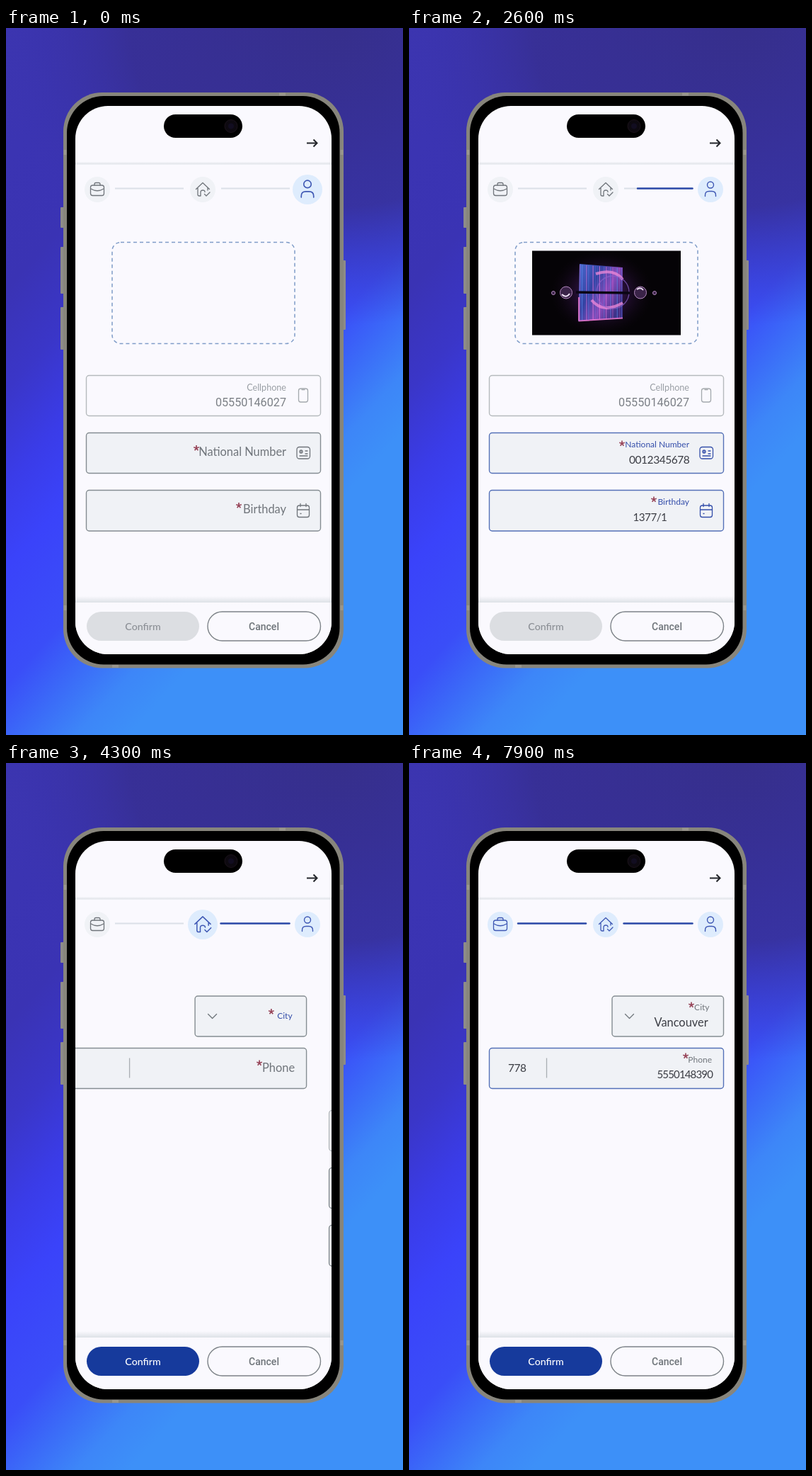
Write an HTML page that moves like this. It is 561x998 px and loops after 8000 ms.

```html
<!DOCTYPE html>
<html lang="en">
<head>
<meta charset="utf-8">
<title>Sign-up form</title>
<style>
html, body { margin: 0; width: 100%; height: 100%; overflow: hidden; background: #3a42fa; }
svg { display: block; width: 100vw; height: 100vh; }
text { font-family: Lato, sans-serif; font-size: 16.4px; fill: #70757b; }
.end { text-anchor: end; }
.mid { text-anchor: middle; }
.roboto { font-family: Roboto, sans-serif; }
.value { fill: #3c3e45; }
.icon { fill: none; stroke: #70777c; stroke-width: 1.3; stroke-linecap: round; stroke-linejoin: round; }
.box { fill: #f0f2f6; stroke: #858d92; stroke-width: 1.4; }
.rail { stroke: #dbe0e8; stroke-width: 1.8; }
.bar { stroke: #2b49a8; stroke-width: 2.5; stroke-linecap: round; }
.star { stroke: #98465a; stroke-width: 1.7; fill: none; }
</style>
</head>
<body>
<svg viewBox="0 0 561 998" preserveAspectRatio="none">
  <defs>
    <linearGradient id="sky" gradientUnits="userSpaceOnUse" x1="0" y1="0" x2="592" y2="536">
      <stop offset="0" stop-color="#3c35b0"/>
      <stop offset=".31" stop-color="#3a33b4"/>
      <stop offset=".43" stop-color="#3a36c8"/>
      <stop offset=".54" stop-color="#3a3ce8"/>
      <stop offset=".64" stop-color="#3a43fa"/>
      <stop offset=".78" stop-color="#3a4ef8"/>
      <stop offset=".865" stop-color="#3b6ef8"/>
      <stop offset=".93" stop-color="#3d86f8"/>
      <stop offset="1" stop-color="#3d90f8"/>
    </linearGradient>
    <radialGradient id="dusk">
      <stop offset="0" stop-color="#362f8c"/>
      <stop offset=".6" stop-color="#372f92" stop-opacity=".85"/>
      <stop offset="1" stop-color="#3a34b0" stop-opacity="0"/>
    </radialGradient>
    <linearGradient id="neon" x1="0" y1="0" x2="1" y2=".6">
      <stop offset="0" stop-color="#4a6ad0"/>
      <stop offset=".4" stop-color="#3240a0"/>
      <stop offset=".7" stop-color="#8a48b8"/>
      <stop offset="1" stop-color="#3a2c80"/>
    </linearGradient>
    <radialGradient id="halo">
      <stop offset="0" stop-color="#7a3ab0" stop-opacity=".75"/>
      <stop offset=".5" stop-color="#4a1c6a" stop-opacity=".4"/>
      <stop offset="1" stop-color="#1a0a20" stop-opacity="0"/>
    </radialGradient>
    <linearGradient id="shade" x1="0" y1="0" x2="0" y2="1">
      <stop offset="0" stop-color="#dfe3e8" stop-opacity="0"/>
      <stop offset="1" stop-color="#dde1e6"/>
    </linearGradient>
    <clipPath id="screen"><rect x="98" y="110" width="362" height="774" rx="46"/></clipPath>
    <clipPath id="reveal"><rect id="wipe" x="174" y="314.5" width="210" height="0"/></clipPath>
  </defs>

  <rect width="561" height="998" fill="url(#sky)"/>
  <ellipse cx="470" cy="0" rx="490" ry="420" fill="url(#dusk)"/>

  <g fill="#8d8b88">
    <rect x="77" y="253" width="7" height="29" rx="1"/>
    <rect x="77" y="309" width="7" height="66" rx="1"/>
    <rect x="77" y="394" width="7" height="60" rx="1"/>
    <rect x="474" y="328" width="6" height="98" rx="1"/>
  </g>
  <rect x="81" y="91" width="396" height="812.5" rx="55" fill="#87857c"/>
  <path d="M386 93.5h9M150 901h9M83.5 172v7M474.5 172v7M83.5 815v7M474.5 815v7" stroke="#99968c" stroke-width="4"/>
  <rect x="86" y="96" width="385.5" height="802.5" rx="52"/>

  <g clip-path="url(#screen)">
    <rect x="98" y="110" width="362" height="774" fill="#faf9fe"/>

    <g id="pageA">
      <rect x="150" y="302.5" width="258" height="143" rx="12" fill="none" stroke="#7f9cc8" stroke-width="1.5" stroke-dasharray="5 4"/>
      <g clip-path="url(#reveal)">
        <rect x="174" y="314" width="210" height="120" fill="#050306"/>
        <ellipse cx="272" cy="374" rx="72" ry="60" fill="url(#halo)"/>
        <path d="M241 333L302 338V410L239 414Z" fill="url(#neon)"/>
        <g id="threads" stroke-width="1.2"></g>
        <path d="M264 347q26-8 38 8M258 384q16 20 44 4" fill="none" stroke="#f08ada" stroke-width="4" opacity=".75"/>
        <path d="M239.5 413.5L302 409.5M240 380v33" stroke="#f07ad0" stroke-width="2" opacity=".8"/>
        <circle cx="288" cy="373" r="23" fill="none" stroke="#8a62cc" stroke-width="1.3" opacity=".7"/>
        <path d="M236 373L312 374" stroke="#0a0614" stroke-width="3.5"/>
        <g fill="#3a2348" stroke="#b58ac0">
          <circle cx="222" cy="373.5" r="8.5"/><circle cx="327" cy="373.5" r="8.5"/>
          <circle cx="204" cy="374" r="2.5"/><circle cx="347" cy="374" r="2.5"/>
        </g>
        <path d="M216 376q6 6 11-1M322 369q5-4 9 1" fill="none" stroke="#eee0f4" stroke-width="2"/>
      </g>

      <rect x="113.5" y="490.5" width="331" height="57" rx="4" fill="none" stroke="#b5babd" stroke-width="1.4"/>
      <text class="end" x="396" y="512" style="font-size:12.6px;fill:#9a9fa5">Cellphone</text>
      <text class="end roboto" x="396" y="533.5" style="font-size:16.2px;fill:#7c8086">05550146027</text>
      <g class="icon" style="stroke:#a4a9ad"><rect x="413.5" y="509" width="13" height="19" rx="3"/><path d="M418 510.5h4"/></g>

      <rect id="natBox" class="box" x="113.5" y="571.5" width="331" height="57" rx="4"/>
      <g id="natIcon" class="icon"><rect x="411" y="591.5" width="18.5" height="16.5" rx="3.5"/><circle cx="417" cy="598" r="2"/><path d="M417 597.5v1M423 597h3M423 601h3M415 604h11"/></g>
      <rect id="dobBox" class="box" x="113.5" y="652.5" width="331" height="57.5" rx="4"/>
      <g id="dobIcon" class="icon"><rect x="411.5" y="674" width="17" height="16.5" rx="3"/><path d="M412 680h16M416 671.5v4M424 671.5v4M416 685.5h1"/></g>
      <text id="natValue" class="value" x="311" y="614.5" style="font-size:15.5px;letter-spacing:-.45px"></text>
      <text id="dobValue" class="value" x="316.5" y="695.5" style="font-size:15.2px;letter-spacing:-.5px"></text>
    </g>

    <g id="pageB">
      <rect id="cityBox" class="box" x="287" y="329" width="157.5" height="57" rx="4"/>
      <path d="M305.5 354.5l6 6 6-6" class="icon"/>
      <rect id="telBox" class="box" x="113.5" y="402.5" width="331" height="57" rx="4"/>
      <path d="M194.5 416.5v28" stroke="#a9aeb3" stroke-width="1.3"/>
      <text id="cityValue" class="value" x="346.5" y="372"></text>
      <text id="codeValue" class="value" x="140" y="435.5" style="font-size:15.5px;letter-spacing:-.5px"></text>
      <text id="telValue" class="value" x="350.5" y="445" style="font-size:15px;letter-spacing:-.85px"></text>
    </g>

    <rect x="98" y="188.5" width="362" height="4" fill="url(#shade)"/>
    <path d="M425 162.5h14M434.5 157.5l5 5-5 5" fill="none" stroke="#25272c" stroke-width="2"/>

    <path class="rail" d="M154 226.5H251M304 226.5H401"/>
    <path id="barA" class="bar"/>
    <path id="barB" class="bar"/>
    <circle id="bagDot"/>
    <circle id="homeDot"/>
    <circle id="userDot"/>
    <g id="bagIcon" class="icon"><rect x="-9.5" y="-6" width="19" height="14.5" rx="3"/><path d="M-4-6v-1.5q0-2 2-2h4q2 0 2 2v1.5M-9-1q9 5.5 18 0"/></g>
    <g id="homeIcon" class="icon"><path d="M-9.5-.5L0-9.5L9.500-.5M-7-2v9q0 2 2 2h2v-5q0-3 3-3t3 2.500M7-3v4M2.500 6.500l2.500 2.500 5-5"/></g>
    <g id="userIcon" class="icon" style="stroke-width:1.4"><circle cy="-6.5" r="4.5"/><path d="M-7.5 9.500v-1.500q0-5.500 5.500-5.500h4q5.500 0 5.500 5.500v1.500"/></g>

    <rect x="98" y="811" width="362" height="74" fill="#faf9fe"/>
    <rect x="98" y="802" width="362" height="9" fill="url(#shade)"/>
    <rect id="okBox" x="114" y="824" width="159" height="41" rx="20.5"/>
    <text id="okText" class="mid" x="193.5" y="850" style="font-size:14.2px;font-weight:500">Confirm</text>
    <rect x="285" y="824" width="159.5" height="41" rx="20.5" fill="none" stroke="#7d8388" stroke-width="1.4"/>
    <text class="mid roboto" x="364.5" y="850" style="font-size:14px;font-weight:500;fill:#6f757a">Cancel</text>
  </g>

  <rect x="223" y="122" width="111" height="33" rx="16.5"/>
  <circle cx="318" cy="138.5" r="9" fill="#0d0910" stroke="#1b131a"/>
  <circle cx="318" cy="138.5" r="4" fill="#120d20"/>
</svg>
<script>
const LOOP = 8000, SLIDE = 363;
const NS = 'http://www.w3.org/2000/svg';
const $ = id => document.getElementById(id);
const set = (el, attrs) => { for (const k in attrs) el.setAttribute(k, attrs[k]); };
const make = (parent, tag, attrs) => {
  const el = document.createElementNS(NS, tag);
  set(el, attrs);
  return parent.appendChild(el);
};
const ramp = (t, [a, b]) => Math.min(1, Math.max(0, (t - a) / (b - a)));
const smooth = p => p * p * (3 - 2 * p);
const lerp = (a, b, p) => a + (b - a) * p;
const fade = (t, on, off) => smooth(ramp(t, on)) * (off ? 1 - smooth(ramp(t, off)) : 1);
const mix = (a, b, p) => `rgb(${a.map((v, i) => Math.round(lerp(v, b[i], p)))})`;
const track = (t, keys) => {
  let v = keys[0][1];
  for (let i = 1; i < keys.length; i++)
    v = lerp(v, keys[i][1], ramp(t, [keys[i - 1][0], keys[i][0]]));
  return v;
};

const GREY = [112, 117, 123], EDGE = [133, 141, 146], BLUE = [52, 78, 170];
const OFF = [240, 242, 246], LIT = [222, 236, 253];

// Each field: label that floats up, highlight times, star path, right edge and baselines
const fields = [
  { id: 'nat', page: 'pageA', label: 'National Number', x: 396, y: [604, 592], star: [[269, 593], [301, 586.5]],
    float: [1000, 1350], labelOff: [2600, 3700], edge: [1100, 1500], edgeOff: [2500, 3600] },
  { id: 'dob', page: 'pageA', label: 'Birthday', x: 396, y: [685, 673], star: [[329, 674], [346, 665.5]],
    float: [1950, 2350], labelOff: [3400, 3900], edge: [2050, 2450], edgeOff: [3400, 3900] },
  { id: 'city', page: 'pageB', label: 'City', x: 424.5, y: [361.5, 349], star: [[390.5, 351], [399, 341.5]],
    float: [4050, 4550], labelOff: [5600, 6200], edge: [4650, 5000], edgeOff: [6200, 6900] },
  { id: 'tel', page: 'pageB', label: 'Phone', x: 428, y: [435.5, 422.5], star: [[378, 423.5], [391, 413.5]],
    float: [5600, 6000], labelOff: [7300, 7800], edge: [6600, 7100] }
];
const typed = [
  ['natValue', '0012345678', [1300, 1800]],
  ['dobValue', '1377/12/20', [2300, 2750]],
  ['cityValue', 'Vancouver', [4950, 5600]],
  ['codeValue', '778', [5850, 6200]],
  ['telValue', '5550148390', [6280, 7300]]
];

let arms = '';
for (let i = 0; i < 5; i++) {
  const a = (i * 72 - 90) * Math.PI / 180;
  arms += `M0 0L${4 * Math.cos(a)} ${4 * Math.sin(a)}`;
}
for (const f of fields) {
  f.text = make($(f.page), 'text', { class: 'end', x: f.x });
  f.text.textContent = f.label;
  f.mark = make($(f.page), 'path', { class: 'star', d: arms });
}
for (let i = 0; i < 20; i++) {
  const x = 241.5 + i * 3.1;
  make($('threads'), 'path', {
    d: `M${x} ${334 + i * .25}V${413 - i * .2}`,
    stroke: i % 3 ? '#5f8cf0' : '#e27ae0',
    opacity: .4 + .3 * Math.sin(i * 2.3)
  });
}

function drawField(f, t) {
  const p = ramp(t, f.float);
  const shrink = smooth(ramp(p, [0, .5]));
  const lift = smooth(ramp(p, [.5, 1]));
  set(f.text, { y: lerp(...f.y, lift) });
  f.text.style.fontSize = lerp(16.4, 12, shrink) + 'px';
  f.text.style.fill = mix(GREY, BLUE, shrink * (1 - smooth(ramp(t, f.labelOff))));
  const [a, b] = f.star;
  set(f.mark, { transform: `translate(${lerp(a[0], b[0], p)} ${lerp(a[1], b[1], lift)})` });
  const on = fade(t, f.edge, f.edgeOff);
  $(f.id + 'Box').style.stroke = mix(EDGE, [84, 112, 184], on);
  const icon = $(f.id + 'Icon');
  if (icon) icon.style.stroke = mix(GREY, BLUE, on);
}

function drawStep(name, x, lit, big) {
  set($(name + 'Dot'), { cx: x, cy: 228, r: 18 + 3 * big, fill: mix(OFF, LIT, lit) });
  set($(name + 'Icon'), { transform: `translate(${x} 228) scale(${1 + big / 6})` });
  $(name + 'Icon').style.stroke = mix(GREY, [63, 88, 180], lit);
}

function drawBar(id, x, len) {
  set($(id), { d: `M${x} 226.5H${x - len}`, visibility: len > 0 ? 'visible' : 'hidden' });
}

function draw(t) {
  const wipe = ramp(t, [200, 900]);
  set($('wipe'), { height: 119 * (1 - (1 - wipe) ** 2) });

  const slide = 1 - (1 - ramp(t, [3650, 4700])) ** 3;
  set($('pageA'), { transform: `translate(${SLIDE * slide} 0)` });
  set($('pageB'), { transform: `translate(${SLIDE * (slide - 1)} 0)` });

  fields.forEach(f => drawField(f, t));
  for (const [id, str, span] of typed)
    $(id).textContent = str.slice(0, Math.floor(ramp(t, span) * str.length + .001));

  drawBar('barA', 400.5, track(t, [[200, 0], [800, 25], [1900, 47], [3050, 97]]));
  drawBar('barB', 250, track(t, [[4850, 0], [5700, 43], [6500, 67], [7350, 96]]));

  const home = fade(t, [3750, 4200]);
  drawStep('user', 426, 1, 1 - fade(t, [1000, 1700]));
  drawStep('home', 278, home, home - fade(t, [6900, 7400]));
  drawStep('bag', 129, fade(t, [7050, 7450]), 0);

  const ready = fade(t, [2650, 3200]);
  $('okBox').style.fill = mix([220, 222, 226], [22, 58, 156], ready);
  $('okText').style.fill = mix([139, 143, 149], [255, 255, 255], ready);
}

function tick() {
  draw(performance.now() % LOOP);
  requestAnimationFrame(tick);
}
tick();
</script>
</body>
</html>
```
